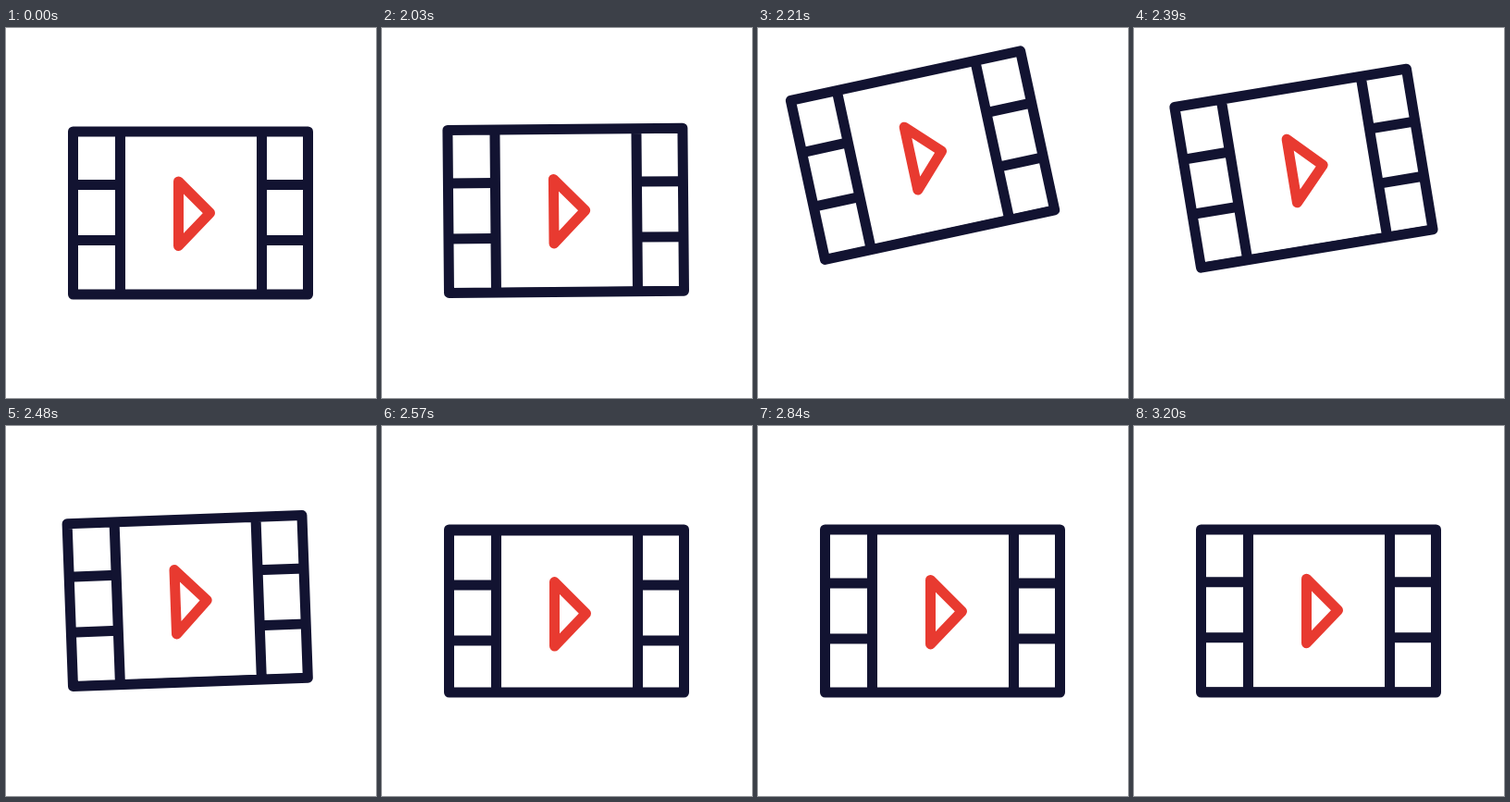
These frames come from a looping animation (400x400 px, 3290 ms). An HTML page:

```html
<!DOCTYPE html>
<html lang="en">
<head>
<meta charset="utf-8">
<title>Film roll</title>
<style>
  html, body { margin: 0; height: 100%; overflow: hidden; background: #fff; }
  svg { display: block; width: 100%; height: 100%; }
</style>
</head>
<body>
<svg viewBox="0 0 400 400" fill="none" stroke="#121331" stroke-width="11" stroke-linejoin="round">
  <defs>
    <clipPath id="window"><rect x="72.5" y="112" width="254" height="176"/></clipPath>
    <g id="cell">
      <path d="M72 110.5H327M72 169.5h51m153 0h51M72 229.5h51m153 0h51"/>
      <path stroke="#e83a30" d="M186.5 166L220.5 200L186.5 235.5Z"/>
    </g>
  </defs>
  <g id="film">
    <g clip-path="url(#window)">
      <g id="strip">
        <use href="#cell" y="-356"/>
        <use href="#cell" y="-178"/>
        <use href="#cell"/>
        <use href="#cell" y="178"/>
      </g>
    </g>
    <path d="M72.5 112H326.5V288H72.5ZM123.5 112V288M276.5 112V288"/>
  </g>
</svg>
<script>
const LOOP = 3290, FIRST = 2030, LAST = 3200, STEP = 30;
const film = document.getElementById('film');
const strip = document.getElementById('strip');

// Cubic Bézier easing with control points (a, 0) and (b, 1)
function ease(x, a, b) {
  x = Math.min(1, Math.max(0, x));
  let lo = 0, hi = 1;
  for (let i = 0; i < 24; i++) {
    const s = (lo + hi) / 2, r = 1 - s;
    if (3 * s * r * r * a + 3 * s * s * r * b + s ** 3 < x) lo = s; else hi = s;
  }
  return lo * lo * (3 - 2 * lo);
}

// Jump up with a tilt and land again, symmetric in time
function jump(t) {
  return ease(1 - Math.abs(t - 2270) / 270, 0.333, 0.45);
}

// Roll down past the next cell, then settle back
function roll(t) {
  return 189 * ease((t - 2540) / 360, 0.42, 0.58)
       - 11.8 * ease((t - 2900) / 300, 0.33, 0.3);
}

function draw(now) {
  const t = now % LOOP;
  const time = t < FIRST ? 0
    : Math.min(LAST, FIRST + Math.floor((t - FIRST) / STEP) * STEP);
  const lift = jump(time);
  film.setAttribute('transform', `translate(0 ${-40 * lift}) rotate(${-13 * lift} 72.5 288)`);
  strip.setAttribute('transform', `translate(0 ${roll(time)})`);
}

function tick() {
  draw(performance.now());
  requestAnimationFrame(tick);
}
tick();
</script>
</body>
</html>
```
